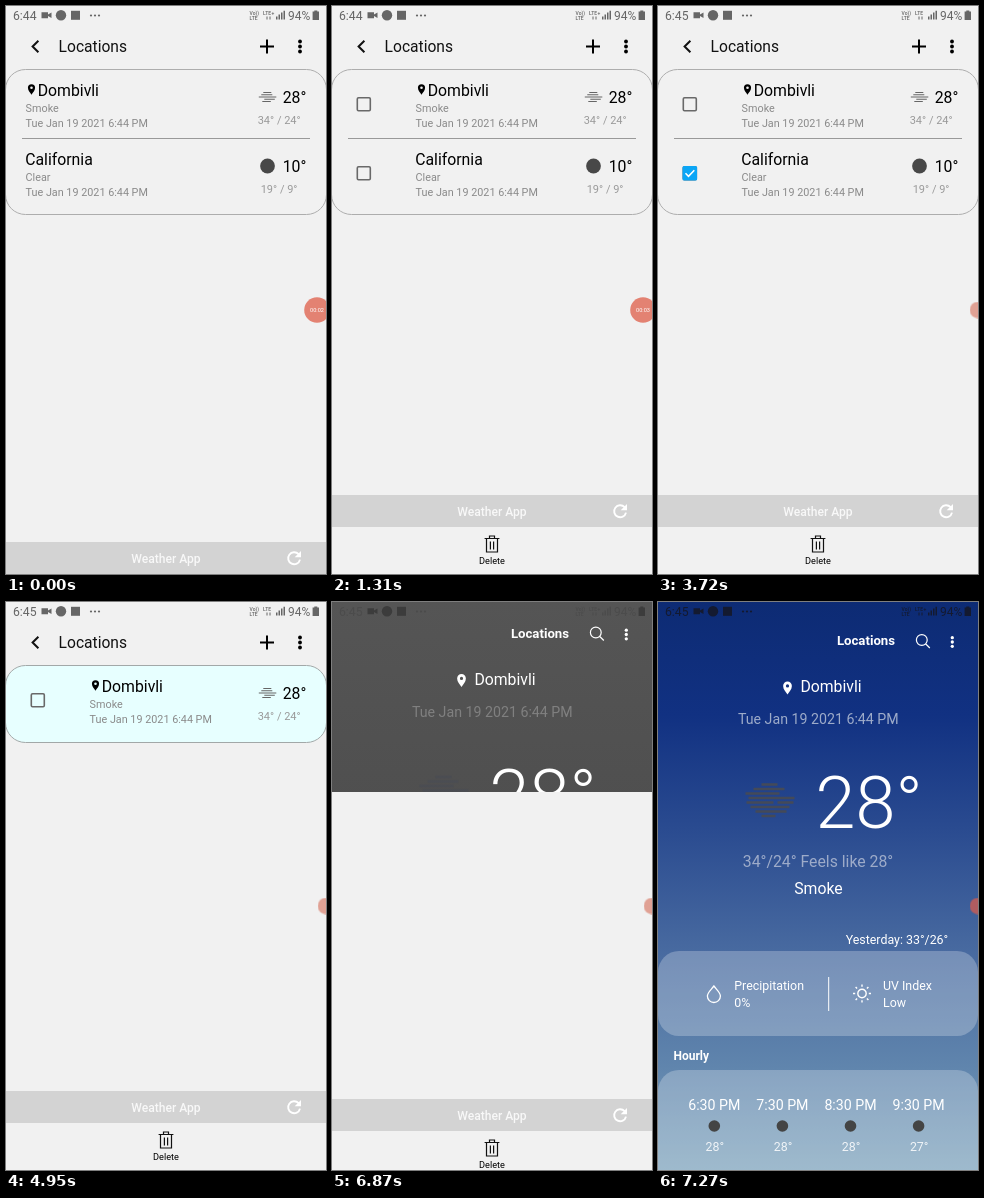
Write an HTML page that moves like this. It is 320 px wide and 568 px high and loops after 8 s.

```html
<!DOCTYPE html>
<html lang="en">
<head>
<meta charset="utf-8">
<title>Weather locations</title>
<style>
html, body { margin: 0; width: 100%; height: 100%; overflow: hidden; background: #f1f1f1; }
svg.layer { position: absolute; left: 0; top: 0; width: 320px; height: 568px; }
text { font-family: Roboto, Inter, sans-serif; white-space: pre; }
.mid { text-anchor: middle; }
.t16 { font-size: 15.8px; }
.t14 { font-size: 14.2px; }
.t12 { font-size: 12.4px; }
.sub { font-size: 10.8px; fill: #8a8a8a; }
.range { font-size: 11px; fill: #999; }
.line { fill: none; stroke: currentColor; }

/* Every track lasts one loop; percentages are ms / 80. */
.a { animation: 8s step-end infinite; }

/* list screen */
.body { animation-name: indent; }
.edit { animation-name: edit; }
.bar { animation-name: lift; }
.row2 { animation-name: press; }
.tick { animation-name: tick; }
.pair { animation-name: pair; }
.single { animation-name: single; }
.del { animation-name: tap; }
.list { animation-name: sink; }
@keyframes indent { 0% { transform: none } 11.875% { transform: translateX(64px) } }
@keyframes edit { 0% { opacity: 0 } 11.875% { opacity: 1 } }
@keyframes lift { 0% { transform: none } 11.875% { transform: translateY(-47px) } }
@keyframes press {
  0% { opacity: 1 } 4.5% { opacity: .2 }
  13.875% { opacity: .45 } 15.125% { opacity: .75 } 16.375% { opacity: 1 }
  28.125% { opacity: .2 } 30.625% { opacity: .4 } 31.875% { opacity: .6 }
  33.125% { opacity: .85 } 34.375% { opacity: 1 } 60.625% { opacity: 0 }
}
@keyframes tick { 0% { opacity: 0 } 29.375% { opacity: 1 } 58.75% { opacity: 0 } }
@keyframes pair { 0% { opacity: 1 } 60.625% { opacity: 0 } }
@keyframes single { 0% { opacity: 0 } 60.625% { opacity: 1 } }
@keyframes tap { 0% { opacity: 1 } 45.25% { opacity: .4 } 46.5% { opacity: 1 } }
@keyframes sink {
  0% { transform: none } 85.875% { transform: translateY(8px) }
  87.125% { transform: translateY(18px) } 88.375% { transform: translateY(24px) }
}

/* home screen revealed from the top */
#home { animation-name: reveal; }
.settle { animation-name: settle; }
.grey { animation-name: grey; }
.haze { animation-name: haze; }
.soft { fill: #9dabc9; animation-name: soft; }
.faint { animation-name: faint; }
@keyframes reveal {
  0% { clip-path: inset(0 0 568px 0) } 85.875% { clip-path: inset(0 0 378px 0) }
  87.125% { clip-path: inset(0 0 110px 0) } 88.375% { clip-path: inset(0 0 14px 0) }
  89.625% { clip-path: inset(0) }
}
@keyframes settle {
  0% { transform: translateY(-7.5px) } 87.125% { transform: translateY(-2px) }
  88.375% { transform: none }
}
@keyframes grey { 0% { opacity: 1 } 89.625% { opacity: .5 } 90.875% { opacity: 0 } }
@keyframes haze { 0% { opacity: .4 } 87.125% { opacity: .2 } 88.375% { opacity: 0 } 89.625% { opacity: .5 } 90.875% { opacity: 1 } }
@keyframes soft { 0% { fill: #808080 } 88.375% { fill: #999 } 90.875% { fill: #9dabc9 } }
@keyframes faint { 0% { opacity: .75 } 90.875% { opacity: 1 } }

/* status bar and recorder bubble */
#status { color: #666; animation-name: ink; }
.m44 { animation-name: m44; }
.m45 { animation-name: m45; }
.plus { animation-name: plus; }
.dim { animation-name: dim; }
.bubble { animation-name: dock; }
.bubble circle { animation-name: tint; }
.s2 { animation-name: s2; }
.s3 { animation-name: s3; }
.s4 { animation-name: s4; }
@keyframes ink { 0% { color: #666 } 85.875% { color: #3c3c3c } 90.875% { color: #141a30 } }
@keyframes m44 { 0% { opacity: 1 } 39.125% { opacity: 0 } }
@keyframes m45 { 0% { opacity: 0 } 39.125% { opacity: 1 } }
@keyframes plus { 0% { opacity: 1 } 45.25% { opacity: 0 } 70.125% { opacity: 1 } }
@keyframes dim { 0% { opacity: 1 } 85.875% { opacity: .35 } 88.375% { opacity: .2 } 90.875% { opacity: 1 } }
@keyframes dock {
  0% { transform: translate(311px, 304px) }
  28.125% { transform: translate(312px, 304px) scale(.95) }
  29.375% { transform: translate(314px, 304px) scale(.86) }
  30.625% { transform: translate(316px, 304px) scale(.78) }
  31.875% { transform: translate(318px, 304px) scale(.71) }
  33.125% { transform: translate(320px, 304px) scale(.65) }
}
@keyframes tint {
  0% { fill: #e38272 } 20.75% { fill: #e4a295 } 34.375% { fill: #979797 }
  45.25% { fill: #e0a194 } 88.375% { fill: #6a6a6a } 89.625% { fill: #8c6266 } 90.875% { fill: #b05c60 }
}
@keyframes s2 { 0% { opacity: 1 } 8.25% { opacity: 0 } }
@keyframes s3 { 0% { opacity: 0 } 8.25% { opacity: 1 } 20.75% { opacity: 0 } }
@keyframes s4 { 0% { opacity: 0 } 20.75% { opacity: 1 } 28.125% { opacity: 0 } }
</style>
</head>
<body>

<svg class="layer" viewBox="0 0 320 568">
  <defs>
    <path id="pin" fill-rule="evenodd" d="M0 5.8C-1.5 3.4-3.8 1.4-3.8-1.6A3.8 3.8 0 0 1 3.8-1.6C3.8 1.4 1.5 3.4 0 5.8ZM0-3A1.4 1.4 0 1 0 0-.2A1.4 1.4 0 1 0 0-3Z"/>
    <path id="smoke" class="line" d="M-8-15.5H8M-16-11H15M-24-6.5H10M-21-2H25M-23 2.5H4M8 2.5H24M-19 7H20M-14 11.5H17M-8 16H6"/>
    <path id="wisp" class="line" d="M-4-4.5H4M-6-2.3H5M-8.5 0H9M-3 2.3H7.5M-5 4.5H3.5"/>
    <rect id="box" class="line" x="25.3" y="91.8" width="13" height="13" rx="1.2" stroke-width="1.6"/>
    <g id="menu"><circle r="1.9" cy="-5"/><circle r="1.9"/><circle r="1.9" cy="5"/></g>
    <linearGradient id="blue" x2="0" y2="1">
      <stop offset="0" stop-color="#0d2b74"/>
      <stop offset=".2" stop-color="#113182"/>
      <stop offset=".4" stop-color="#2a4b90"/>
      <stop offset=".6" stop-color="#46689f"/>
      <stop offset=".82" stop-color="#6085ad"/>
      <stop offset="1" stop-color="#7ea3bc"/>
    </linearGradient>
    <linearGradient id="ash" x2="0" y2="1">
      <stop offset="0" stop-color="#555"/>
      <stop offset=".42" stop-color="#4e4e4e"/>
      <stop offset=".53" stop-color="#535353"/>
      <stop offset=".54" stop-color="#5f5f5f"/>
      <stop offset=".62" stop-color="#6e6e6e"/>
      <stop offset=".82" stop-color="#7c7c7c"/>
      <stop offset="1" stop-color="#888"/>
    </linearGradient>
  </defs>

  <g class="list a">
    <rect y="-30" width="320" height="640" fill="#f1f1f1"/>
    <path d="M32.4 34.8L26.6 40.5L32.4 46.2" fill="none" stroke="#111" stroke-width="2"/>
    <text x="52.6" y="46" font-size="15.6" fill="#111">Locations</text>
    <path d="M254 40.5H268M261 33.5V47.5" stroke="#000" stroke-width="2"/>
    <use href="#menu" x="294" y="40.5"/>

    <g class="pair a">
      <rect x="-.5" y="63.5" width="321" height="145" rx="20" fill="none" stroke="#adadad"/>
      <path d="M16 132.5H304" stroke="#999"/>
    </g>
    <rect class="single a" x="-.5" y="63.5" width="321" height="77" rx="20" fill="#e7ffff" stroke="#a2a8a8"/>

    <g>
      <g class="edit a" color="#696969"><use href="#box"/></g>
      <g class="body a">
        <use href="#pin" transform="translate(25.5 83.3) scale(.94)"/>
        <text class="t16" x="31.7" y="89.5">Dombivli</text>
        <text class="sub" x="19.6" y="105.5">Smoke</text>
        <text class="sub" x="19.6" y="120.5">Tue Jan 19 2021 6:44 PM</text>
      </g>
      <use href="#wisp" color="#666" stroke-width="1.1" x="261.3" y="91"/>
      <text class="t16" x="276.7" y="97">28°</text>
      <text class="range" x="251.7" y="118">34° / 24°</text>
    </g>

    <g class="row2 a">
      <g class="edit a" color="#696969"><use href="#box" y="69"/></g>
      <g class="tick a">
        <rect x="24.5" y="160" width="14.6" height="14.6" rx="1.6" fill="#0ba6f6"/>
        <path d="M27.5 167.3L30.5 170.3L36.3 164.3" fill="none" stroke="#fff" stroke-width="1.6"/>
      </g>
      <g class="body a">
        <text class="t16" x="19.2" y="158.5">California</text>
        <text class="sub" x="19.6" y="174.5">Clear</text>
        <text class="sub" x="19.6" y="189.5">Tue Jan 19 2021 6:44 PM</text>
      </g>
      <circle cx="261.5" cy="160" r="7.4" fill="#484848"/>
      <text class="t16" x="276.7" y="166">10°</text>
      <text class="range" x="254.7" y="187">19° / 9°</text>
    </g>

    <g class="bar a">
      <rect y="536" width="320" height="32" fill="#d3d3d3"/>
      <text class="mid" x="160" y="557" font-size="12.1" font-weight="500" fill="#f8f8f8">Weather App</text>
      <path d="M292.6 548.2A6 6 0 1 0 294 553.6" fill="none" stroke="#fff" stroke-width="1.9"/>
      <path d="M295 545V551.3H288.7Z" fill="#fff"/>
    </g>

    <g class="edit a">
      <g class="del a">
        <path d="M152.6 532.5H167.4M157.5 532V530H162.5V532M154.5 533V546H165.5V533M158.4 535.5V543.5M161.6 535.5V543.5" fill="none" stroke="#111" stroke-width="1.2"/>
        <text class="mid" x="160" y="557.5" font-size="9.2">Delete</text>
      </g>
    </g>
  </g>
</svg>

<svg id="home" class="layer a" viewBox="0 0 320 568">
  <rect width="320" height="568" fill="url(#blue)"/>
  <rect class="grey a" width="320" height="568" fill="url(#ash)"/>
  <g class="settle a" fill="#fff" color="#fff">
    <text x="178.9" y="43" font-size="13.2" font-weight="700">Locations</text>
    <path class="line" d="M269.2 38A5.4 5.4 0 1 0 258.4 38A5.4 5.4 0 1 0 269.2 38M267.8 42L271.8 46" stroke-width="1.2"/>
    <use href="#menu" transform="translate(294.3 40) scale(.86)"/>

    <use href="#pin" transform="translate(129.5 85.8) scale(1.15)"/>
    <text class="t16" x="142.4" y="90">Dombivli</text>
    <text class="t14 mid soft a" x="160.3" y="122">Tue Jan 19 2021 6:44 PM</text>

    <g class="haze a" color="#444a58"><use href="#smoke" x="111.5" y="198" stroke-width="2.4"/></g>
    <text x="157.6" y="226" font-size="72" font-weight="300">28°</text>
    <text class="mid soft a" x="160" y="265" font-size="15.8">34°/24° Feels like 28°</text>
    <text class="t16 mid" x="160.4" y="292">Smoke</text>
    <text class="t12" x="187.7" y="342">Yesterday: 33°/26°</text>

    <g fill-opacity=".25">
      <rect y="349" width="320" height="85" rx="21"/>
      <rect y="468" width="320" height="140" rx="21"/>
    </g>
    <g class="faint a">
      <path class="line" d="M55.9 384C53.4 387.5 49.4 390.5 49.4 394A6.5 6.5 0 0 0 62.4 394C62.4 390.5 58.4 387.5 55.9 384Z" stroke-width="1.3"/>
      <text class="t12" x="76.3" y="388">Precipitation</text>
      <text class="t12" x="76.3" y="405">0%</text>
      <path d="M170.7 375V409" stroke="#fff"/>
      <g class="line" transform="translate(204 391.5)" stroke-width="1.4">
        <circle r="4.2"/>
        <path d="M0-9V-6.8M0 9V6.8M-9 0H-6.8M9 0H6.8M-6.4-6.4L-4.9-4.9M6.4 6.4L4.9 4.9M-6.4 6.4L-4.9 4.9M6.4-6.4L4.9-4.9"/>
      </g>
      <text class="t12" x="225" y="388">UV Index</text>
      <text class="t12" x="225" y="405">Low</text>
      <text x="15.5" y="458" font-size="12" font-weight="700">Hourly</text>
      <g class="mid" id="hours"></g>
    </g>
  </g>
</svg>

<svg id="status" class="layer a" viewBox="0 0 320 568" fill="currentColor">
  <g class="dim a">
    <text class="m44 a" x="7" y="13.5" font-size="12.2">6:44</text>
    <text class="m45 a" x="7" y="13.5" font-size="12.2">6:45</text>
    <circle cx="85" cy="9.5" r="1.1"/><circle cx="89" cy="9.5" r="1.1"/><circle cx="93" cy="9.5" r="1.1"/>
    <g font-size="5" font-weight="500">
      <text x="243.5" y="8.6">Vo))</text>
      <text x="243.5" y="13.8">LTE</text>
      <text x="257" y="8.6">LTE</text>
      <text class="plus a" x="265.5" y="8.6">+</text>
    </g>
    <path class="line" d="M261 13.5V10.5M264 10.5V13.5" stroke-width="1"/>
    <path d="M270 10.5H271.5V13.5H270ZM272.5 8.5H274V13.5H272.5ZM275 6.5H276.5V13.5H275ZM277.5 4.8H279V13.5H277.5Z"/>
    <text x="282" y="13.5" font-size="12">94%</text>
  </g>
  <path d="M35.5 6.3H42V8.5L45.5 6.5V12L42 10V12.2H35.5Z"/>
  <circle cx="55" cy="9.3" r="5.2"/>
  <rect x="65" y="4.8" width="9" height="9"/>
  <path d="M308.3 4.5H311.3V5.5H313V14H306.6V5.5H308.3Z"/>
</svg>

<svg class="layer" viewBox="0 0 320 568">
  <g class="bubble a">
    <circle class="a" r="12.8" fill="#e38272"/>
    <g class="mid" fill="#fff" font-size="5.6">
      <text class="s2 a" y="2.3">00:02</text>
      <text class="s3 a" y="2.3">00:03</text>
      <text class="s4 a" y="2.3">00:04</text>
    </g>
  </g>
</svg>

<script>
const temps = [28, 28, 28, 27];
document.getElementById('hours').innerHTML = temps.map((temp, i) => {
  const x = 56.3 + 68.1 * i;
  return `<text class="t14" x="${x}" y="508">${6 + i}:30 PM</text>
    <circle cx="${x}" cy="524" r="5.8" fill="#444"/>
    <text class="t12" x="${x + .6}" y="549" fill-opacity=".85">${temp}°</text>`;
}).join('');
</script>
</body>
</html>
```
